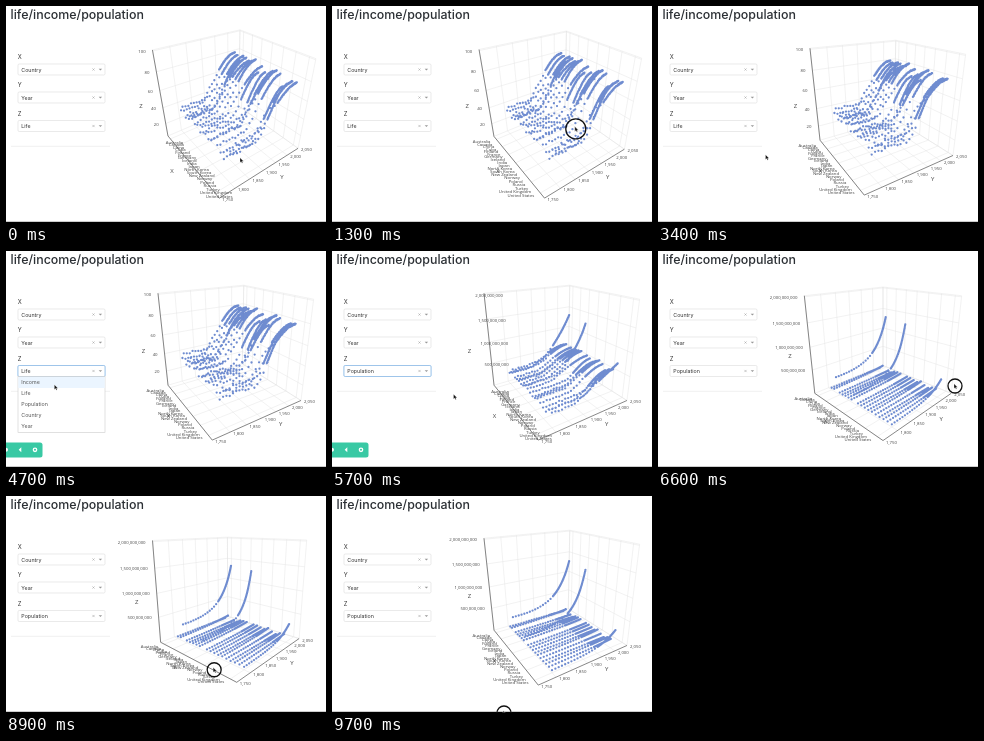
Recreate the animation shown at these times as an HTML page. Size 320 by 217 pixels, loop 9800 ms.

```html
<!DOCTYPE html>
<html lang="en">
<head>
<meta charset="utf-8">
<title>life/income/population</title>
<style>
html, body { margin: 0; width: 100%; height: 100%; overflow: hidden; background: #fff; }
svg { display: block; width: 100vw; height: 100vh; font-family: Inter, "Open Sans", sans-serif; }
.tick { font: 4.3px "Open Sans", sans-serif; fill: #444; }
.axis-title { font: 6px "Open Sans", sans-serif; fill: #444; text-anchor: middle; }
</style>
</head>
<body>
<svg viewBox="0 0 320 217" preserveAspectRatio="none">
  <rect width="320" height="217" fill="#fff"/>
  <text x="4.6" y="12.7" font-size="12.4" font-weight="500" fill="#2c3035">life/income/population</text>
  <path d="M5 140.3H104" stroke="#e6e6e6" stroke-width=".6"/>
  <g id="plot" fill="none">
    <path id="grid" stroke="#e1e1e1" stroke-width=".45"/>
    <path id="axes" stroke="#555" stroke-width=".7"/>
    <path id="spikes" stroke="#555" stroke-width=".6"/>
    <path id="dots" stroke="#6080cb" stroke-width="2.3" stroke-linecap="round" opacity=".9"/>
    <g id="labels"></g>
  </g>
  <g id="form"></g>
  <g id="tools">
    <path d="M0 191.5H34a2.5 2.5 0 0 1 2.5 2.5V204a2.5 2.5 0 0 1-2.5 2.5H0Z" fill="#39c9a4"/>
    <path d="M0 196.8a2 2 0 0 1 0 4M15.3 196.3v5l-2.6-2.5Z" fill="#fff"/>
    <circle cx="29" cy="198.8" r="1.7" fill="none" stroke="#fff" stroke-width="1.3"/>
  </g>
  <rect y="215.8" width="320" height="1.2" fill="#000"/>
  <g id="cursor">
    <circle id="press" fill="none" stroke="#111" stroke-width="1.3"/>
    <path d="M-1-2.3V2.6L.2 1.6 1 3.2 1.8 2.8 1.1 1.3H2.6Z" fill="#111" stroke="#fff" stroke-width=".3"/>
  </g>
</svg>
<script>
const LOOP = 9800;
const $ = id => document.getElementById(id);
const lerp = (a, b, k) => a + (b - a) * k;
const clamp = k => Math.max(0, Math.min(1, k));
const smooth = k => k * k * (3 - 2 * k);
const progress = (t, from, to) => clamp((t - from) / (to - from));
const within = (t, from, to) => t >= from && t < to;
const range = (from, to, step) =>
  Array.from({ length: Math.floor((to - from) / step) + 1 }, (_, i) => from + i * step);

let seed = 11;
const random = () => (seed = seed * 16807 % 2147483647) / 2147483647;

const countries = ("Australia,Canada,China,Cuba,Finland,France,Germany,Iceland,India,Japan,North Korea," +
  "South Korea,New Zealand,Norway,Poland,Russia,Turkey,United Kingdom,United States").split(",");
const lateStarters = ["China", "India", "North Korea", "South Korea", "Turkey", "Russia"];
// Millions of people in 1800 and 2015
const largest = { "China": [330, 1370], "India": [170, 1310], "United States": [6, 322] };

// Every ten years until 1950, then every year
const years = [...range(1800, 1940, 10), ...range(1950, 2015, 1)];
const yearTicks = range(1750, 2050, 50);

const xPos = i => (i + 1.3) / 20.6;
const yPos = year => (year - 1750) / 300;
const lifePos = v => (v - 3) / 98;
const popPos = v => (v + 50) / 2070;

const points = countries.flatMap((name, i) => {
  const late = lateStarters.includes(name);
  const base = (late ? 25 : 32) + 8 * random();
  const peak = (late ? 70 : 78) + 5 * random();
  const start = (late ? 1905 : 1860) + 35 * random();
  const crowd = 90 * random();
  const [from, to] = largest[name] || [crowd / 6, crowd];
  const bend = from > 100 ? 2.5 : 1;
  return years.map(year => {
    const rise = Math.sin(progress(year, start, 2015) * Math.PI / 2) ** 1.3;
    const wobble = (year < 1950 ? 4 : 1) * (random() - .5);
    return {
      x: xPos(i), y: yPos(year),
      life: lifePos(lerp(base, peak, rise) + wobble),
      pop: popPos(from * (to / from) ** (progress(year, 1800, 2015) ** bend))
    };
  });
});

// Turn and elevation in degrees: lower the view, swing it to the side, bring it back
function cameraAngles(t) {
  const lower = smooth(progress(t, 1100, 2050));
  const swing = progress(t, 6200, 8000);
  const away = 1 - smooth(progress(t, 8200, 9500));
  return [
    53 + 4 * lower - 35 * Math.sin(swing * Math.PI / 2) * away,
    33 - 11 * lower - 16 * smooth(swing) * away
  ];
}

function makeCamera([turn, tilt]) {
  const a = turn * Math.PI / 180, e = tilt * Math.PI / 180;
  const ca = Math.cos(a), sa = Math.sin(a), ce = Math.cos(e), se = Math.sin(e);
  return (x, y, z) => {
    x -= .5; y -= .5; z -= .5;
    const back = ca * y - sa * x;
    const scale = 248 / (2.4 + back * ce - z * se);
    return [225 + (ca * x + sa * y) * scale, 97 - (z * ce + back * se) * scale];
  };
}

// Time, x, y of the places the pointer visits
const stops = [
  [0, 235, 154], [550, 68, 11], [1100, 244, 125], [2100, 242, 105], [3400, 108.5, 151], [4150, 62, 120],
  [5300, 35, 154], [5700, 122.5, 145.5], [6600, 297, 135], [8000, 251.5, 122], [9700, 172, 217]
];

function pointer(t) {
  const next = stops.findIndex(stop => stop[0] > t);
  if (next < 0) return stops[stops.length - 1].slice(1);
  const a = stops[next - 1], b = stops[next];
  const k = smooth(progress(t, a[0], b[0]));
  return [lerp(a[1], b[1], k), lerp(a[2], b[2], k)];
}

const fmt = p => p[0].toFixed(2) + " " + p[1].toFixed(2);
const text = (cls, [x, y], str, anchor = "middle") =>
  `<text class="${cls}" x="${x.toFixed(2)}" y="${y.toFixed(2)}" text-anchor="${anchor}">${str}</text>`;

function drawPlot(t) {
  const angles = cameraAngles(t);
  const project = makeCamera(angles);
  const shifted = (x, y, z, dx, dy) => {
    const p = project(x, y, z);
    return [p[0] + dx, p[1] + dy];
  };
  const line = (...corners) => "M" + corners.map(c => fmt(project(...c))).join("L");
  const fresh = within(t, 5400, 6250);
  const blend = t < 5400 ? 0 : lerp(.6, 1, smooth(progress(t, 5650, 6000)));
  const zTicks = t >= 5400
    ? range(500, 2000, 500).map(v => [popPos(v), v.toLocaleString("en-US") + ",000,000"])
    : range(20, 100, 20).map(v => [lifePos(v), v]);

  let grid = line([0, 0, 1], [0, 1, 1], [1, 1, 1], [1, 1, 0]) + line([0, 1, 1], [0, 1, 0]);
  grid += line([0, 0, 0], [0, 1, 0], [1, 1, 0]);
  for (const [z] of zTicks) grid += line([0, 0, z], [0, 1, z], [1, 1, z]);
  for (const y of yearTicks.map(yPos)) grid += line([1, y, 0], [0, y, 0], [0, y, 1]);
  for (let i = 0; i < countries.length; i += 3) {
    grid += line([xPos(i), 0, 0], [xPos(i), 1, 0], [xPos(i), 1, 1]);
  }
  $("grid").setAttribute("d", grid);
  $("axes").setAttribute("d", line([0, 0, 1], [0, 0, 0], [1, 0, 0], [1, 1, 0]));

  const hover = within(t, 1900, 2400) ? [.55, .33] : within(t, 7800, 8250) ? [.6, .16] : null;
  $("spikes").setAttribute("d", hover
    ? line([hover[0], 1, 0], [hover[0], 1, 1]) + line([0, 0, hover[1]], [0, 1, hover[1]], [1, 1, hover[1]])
    : "");

  $("dots").setAttribute("d", points.map(p =>
    "M" + fmt(project(p.x, p.y, lerp(p.life, p.pop, blend))) + "h0").join(""));

  const centred = t < 1100 || fresh || angles[0] < 35;
  let labels = "";
  countries.forEach((name, i) => {
    labels += centred
      ? text("tick", shifted(xPos(i), 0, 0, 4, 5), name)
      : text("tick", shifted(xPos(i), 0, 0, -6, 4), name, "end");
  });
  for (const year of yearTicks) {
    labels += text("tick", shifted(1, yPos(year), 0, 8.5, 3), year.toLocaleString("en-US"));
  }
  for (const [z, label] of zTicks) {
    labels += fresh
      ? text("tick", shifted(0, 0, z, 5, 3), label)
      : text("tick", shifted(0, 0, z, -7, 2), label, "end");
  }
  labels += text("axis-title", shifted(.5, 0, 0, -18, 10), "X");
  labels += text("axis-title", shifted(1, .5, 0, 19, 8), "Y");
  labels += text("axis-title", shifted(0, 0, .5, -20, 10), "Z");
  $("labels").innerHTML = labels;
}

function field(y, label, value, focused) {
  const glow = focused
    ? `<rect x="11.4" y="${y - .6}" width="88.2" height="12.2" rx="1.8" fill="#d3e6f8"/>` : "";
  return `${glow}<text x="11.8" y="${y - 4.7}" font-size="5.8" fill="#333">${label}</text>
    <rect x="12" y="${y}" width="87" height="11" rx="1.2" fill="#fff"
      stroke="${focused ? "#6ea8e0" : "#dcdcdc"}" stroke-width=".6"/>
    <text x="15.3" y="${y + 7.5}" font-size="5.3" fill="#333">${value}</text>
    <path d="M86.4 ${y + 4.4}l2.2 2.2m0-2.2l-2.2 2.2" stroke="#999" stroke-width=".5"/>
    <path d="M92.7 ${y + 4.7}h3.4l-1.7 1.8Z" fill="#999"/>`;
}

function drawForm(t, pointerY) {
  let html = field(58, "X", "Country") + field(86, "Y", "Year") +
    field(114.5, "Z", t < 5350 ? "Life" : "Population", within(t, 4100, 6300));
  if (within(t, 4100, 5350)) {
    html += `<rect x="12" y="125.5" width="87" height="56" fill="#fff" stroke="#ccc" stroke-width=".6"/>`;
    ["Income", "Life", "Population", "Country", "Year"].forEach((name, i) => {
      const top = 126 + 11 * i;
      if (within(pointerY, top, top + 11)) {
        html += `<rect x="12.3" y="${top}" width="86.4" height="11" fill="#ebf5ff"/>`;
      }
      html += `<text x="15.3" y="${top + 7.4}" font-size="5.3" fill="#555">${name}</text>`;
    });
  }
  $("form").innerHTML = html;
}

function draw(t) {
  const [x, y] = pointer(t);
  drawPlot(t);
  drawForm(t, y);
  $("tools").style.display = within(t, 4100, 6300) ? "" : "none";
  $("cursor").setAttribute("transform", `translate(${x} ${y})`);
  $("press").setAttribute("r", within(t, 1100, 2500) ? 10 : t >= 6300 ? 7 : 0);
}

const begin = performance.now();
function frame() {
  draw((performance.now() - begin) % LOOP);
  requestAnimationFrame(frame);
}
frame();
</script>
</body>
</html>
```
